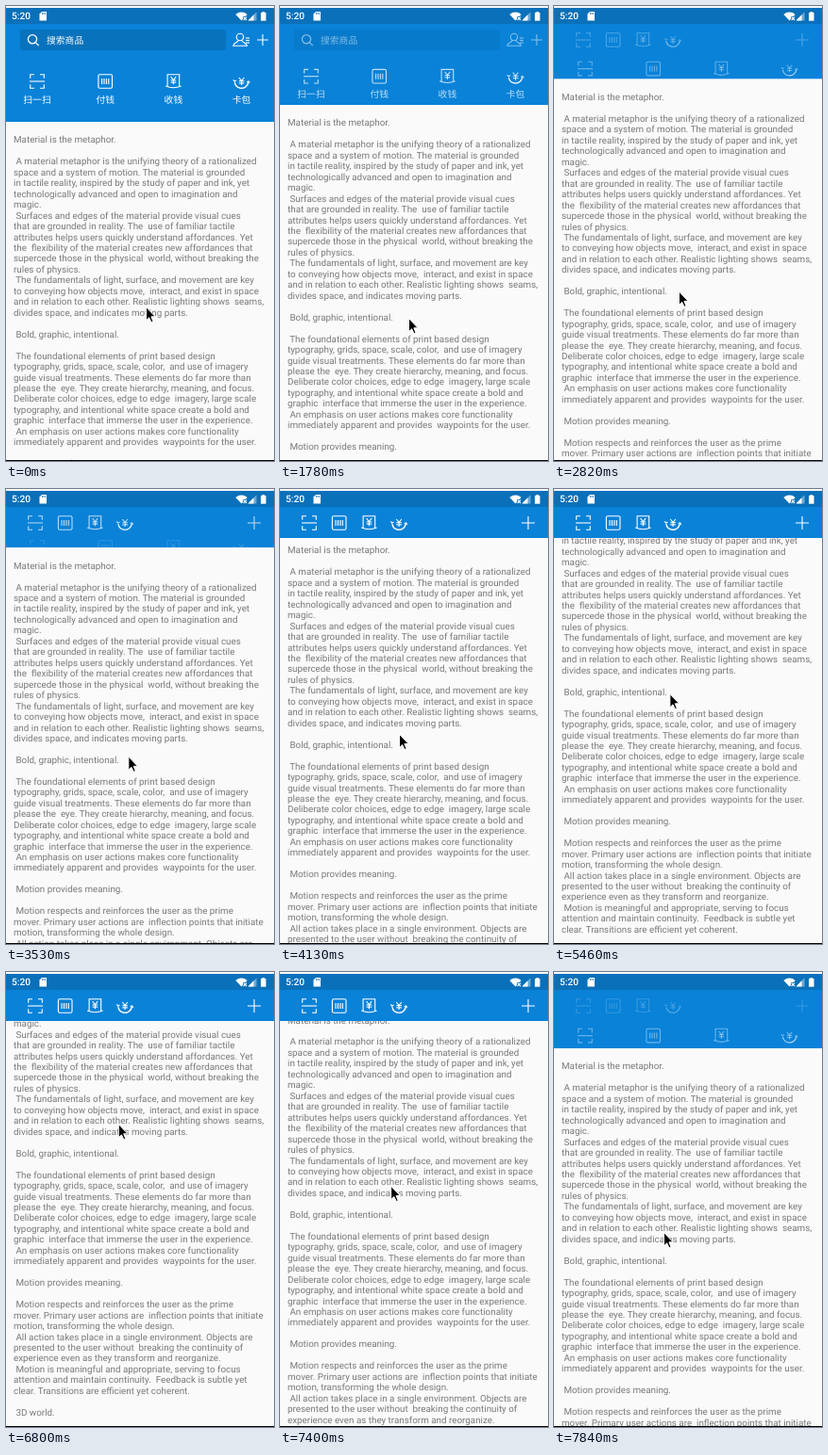
An HTML page with a canvas for the animation above (8 s loop, 284x483 px).

```html
<!DOCTYPE html>
<html lang="en">
<head>
<meta charset="utf-8">
<title>Collapsing header</title>
<style>
html, body { margin: 0; width: 100%; height: 100%; overflow: hidden; background: #fafafa; }
canvas { display: block; width: 284px; height: 483px; }
</style>
</head>
<body>
<canvas id="stage"></canvas>
<script>
const W = 284, H = 483, LOOP = 8000, STEP = 147.4, LAST = 53;
const BLUE = '#0982d8', DARK = '#0a70b9', WHITE = '#fff';
const OPEN = 123, CLOSED = 52, RANGE = OPEN - CLOSED;
const LATIN = 'Roboto, sans-serif', CJK = '"Noto Sans CJK SC", "Noto Sans CJK", sans-serif';

const lines = `Material is the metaphor.

 A material metaphor is the unifying theory of a rationalized
space and a system of motion. The material is grounded
in tactile reality, inspired by the study of paper and ink, yet
technologically advanced and open to imagination and
magic.
 Surfaces and edges of the material provide visual cues
that are grounded in reality. The  use of familiar tactile
attributes helps users quickly understand affordances. Yet
the  flexibility of the material creates new affordances that
supercede those in the physical  world, without breaking the
rules of physics.
 The fundamentals of light, surface, and movement are key
to conveying how objects move,  interact, and exist in space
and in relation to each other. Realistic lighting shows  seams,
divides space, and indicates moving parts.

 Bold, graphic, intentional.

 The foundational elements of print based design
typography, grids, space, scale, color,  and use of imagery
guide visual treatments. These elements do far more than
please the  eye. They create hierarchy, meaning, and focus.
Deliberate color choices, edge to edge  imagery, large scale
typography, and intentional white space create a bold and
graphic  interface that immerse the user in the experience.
 An emphasis on user actions makes core functionality
immediately apparent and provides  waypoints for the user.

 Motion provides meaning.

 Motion respects and reinforces the user as the prime
mover. Primary user actions are  inflection points that initiate
motion, transforming the whole design.
 All action takes place in a single environment. Objects are
presented to the user without  breaking the continuity of
experience even as they transform and reorganize.
 Motion is meaningful and appropriate, serving to focus
attention and maintain continuity.  Feedback is subtle yet
clear. Transitions are efficient yet coherent.

 3D world.`.split('\n');

const clamp = (v, lo, hi) => Math.min(hi, Math.max(lo, v));

// Linear move from a to b between steps s0 and s1, held outside
const move = (n, s0, s1, a, b) => a + (b - a) * clamp((n - s0) / (s1 - s0), 0, 1);

// Sum of moves: start value, then [first step, last step, distance]
const path = (n, start, ...legs) =>
  legs.reduce((v, [s0, s1, d]) => v + move(n, s0, s1, 0, d), start);

// The screen is refreshed in even steps; the hand rests between drags
function poseAt(t) {
  const n = Math.min(LAST, Math.floor(t / STEP));
  return {
    x: path(n, 148, [0, 4, -2], [5, 7, -10], [13, 28, -10], [28, LAST, -10]),
    y: path(n, 318, [0, 4, -8], [5, 7, 39], [8, 12, -19], [13, 37, -114], [37, 46, -56], [46, LAST, 115]),
    scroll: path(n, 0, [8, 12, 18], [13, 28, 59], [28, 37, 56], [37, 41, 23], [46, LAST, -114])
      + (n > 13 && n < 28 ? 4 * Math.sin(Math.PI * (n - 13) / 15) : 0)
  };
}

const canvas = document.getElementById('stage');
const ctx = canvas.getContext('2d');
const dpr = window.devicePixelRatio || 1;
canvas.width = W * dpr;
canvas.height = H * dpr;

function rect(x, y, w, h, color) {
  ctx.fillStyle = color;
  ctx.fillRect(x, y, w, h);
}

function text(str, x, y, font, color, align = 'left') {
  ctx.font = font;
  ctx.fillStyle = color;
  ctx.textAlign = align;
  ctx.fillText(str, x, y);
}

// Strokes polylines given as flat coordinate lists
function stroke(...paths) {
  ctx.beginPath();
  for (const p of paths) {
    ctx.moveTo(p[0], p[1]);
    for (let i = 2; i < p.length; i += 2) ctx.lineTo(p[i], p[i + 1]);
  }
  ctx.stroke();
}

function fill(color, ...p) {
  ctx.fillStyle = color;
  ctx.beginPath();
  for (let i = 0; i < p.length; i += 2) ctx.lineTo(p[i], p[i + 1]);
  ctx.closePath();
  ctx.fill();
}

function arc(x, y, r, a = 0, b = Math.PI * 2) {
  ctx.beginPath();
  ctx.arc(x, y, r, a, b);
  ctx.stroke();
}

function at(x, y, draw) {
  ctx.save();
  ctx.translate(x, y);
  ctx.strokeStyle = WHITE;
  ctx.lineWidth = 1.1;
  draw();
  ctx.restore();
}

function yen() {
  stroke([-2.8, -4, 0, -0.7, 2.8, -4], [0, -0.7, 0, 4]);
  for (const y of [-0.3, 1.9]) stroke([-2.8, y, 2.8, y]);
}

const icons = [
  function scan() {
    for (const sx of [-1, 1]) for (const sy of [-1, 1])
      stroke([sx * 7.3, sy * 3.2, sx * 7.3, sy * 7.3, sx * 3, sy * 7.3]);
    stroke([-8, 0, 8, 0]);
  },
  function pay() {
    ctx.beginPath();
    ctx.roundRect(-7.3, -7.3, 14.6, 14.6, 1.5);
    ctx.stroke();
    for (let x = -3.6; x < 4; x += 2.4) stroke([x, -3, x, 3]);
  },
  function receive() {
    stroke([-6.3, 5.5, -6.3, -7.3, 6.3, -7.3, 6.3, 5.5]);
    ctx.beginPath();
    ctx.moveTo(-8.2, 5);
    ctx.quadraticCurveTo(0, 8.5, 8.2, 5);
    ctx.stroke();
    at(0, -0.8, yen);
  },
  function cards() {
    for (const side of [0, Math.PI]) {
      arc(0, 0, 7.3, side + 0.15, side + 2.95);
      ctx.rotate(Math.PI);
      stroke([-8.8, -1.6, -7.3, 0.3, -5.6, -1.2]);
    }
    yen();
  }
];

function plus(x, r) {
  at(x, 36, () => stroke([-r, 0, r, 0], [0, -r, 0, r]));
}

function statusBar() {
  rect(0, 0, W, 19, DARK);
  rect(0, 0, W, 2, '#f6f8fa');
  text('5:20', 6, 14.3, '500 10.2px ' + LATIN, WHITE);
  fill(WHITE, 38, 6, 43, 6, 43, 15.5, 35.5, 15.5, 35.5, 8.6);
  for (let x = 38; x < 42; x += 1.6) rect(x, 7, 0.7, 2, DARK);
  ctx.fillStyle = WHITE;
  ctx.beginPath();
  ctx.moveTo(249.5, 15.5);
  ctx.arc(249.5, 15.5, 9, -Math.PI * 0.74, -Math.PI * 0.26);
  ctx.fill();
  rect(251, 11, 5, 5, DARK);
  at(253.3, 13.3, () => stroke([-1.7, -1.7, 1.7, 1.7], [-1.7, 1.7, 1.7, -1.7]));
  fill('#6fa9d4', 265.5, 6.2, 265.5, 15.5, 256.5, 15.5);
  fill(WHITE, 262.5, 9.2, 262.5, 15.5, 256.5, 15.5);
  rect(270, 7, 5.5, 8.7, WHITE);
  rect(271.5, 6, 2.5, 1.5, WHITE);
}

function openBar() {
  ctx.fillStyle = '#0872bc';
  ctx.beginPath();
  ctx.roundRect(15, 25, 218, 22, 2.5);
  ctx.fill();
  at(28, 35.3, () => {
    ctx.lineWidth = 1.3;
    arc(0, 0, 4.6);
    stroke([3.3, 3.3, 6.8, 6.8]);
  });
  text('搜索商品', 43, 39.8, '9.8px ' + CJK, WHITE);
  at(248, 36, () => {
    arc(0, -3, 3.7);
    ctx.beginPath();
    ctx.moveTo(-2, 0.5);
    ctx.bezierCurveTo(-2, 3, -7, 2.5, -7.3, 6.3);
    ctx.lineTo(7.5, 6.3);
    ctx.bezierCurveTo(7, 3.2, 2.5, 3, 2, 0.5);
    ctx.stroke();
    for (let y = -2; y < 4; y += 2.5) stroke([6, y, 10, y]);
  });
  plus(272, 6);
}

function closedBar() {
  icons.forEach((icon, i) => at(31 + i * 31.7, 36, icon));
  plus(263, 7);
}

function header(scroll) {
  const bottom = Math.max(CLOSED, OPEN - scroll);
  const shift = OPEN - bottom, half = RANGE / 2;
  ctx.save();
  ctx.beginPath();
  ctx.rect(0, 0, W, bottom);
  ctx.clip();
  rect(0, 0, W, bottom, BLUE);
  ctx.globalAlpha = 1 - shift / RANGE;
  ['扫一扫', '付钱', '收钱', '卡包'].forEach((label, i) => {
    const x = 33 + i * 72.2, y = 80 - shift * 0.295;
    at(x, y, icons[i]);
    text(label, x, y + 22.8, '9.8px ' + CJK, WHITE, 'center');
  });
  // The bar swaps halfway, fading out and in again
  ctx.globalAlpha = Math.abs(shift - half) / half;
  (shift <= half ? openBar : closedBar)();
  ctx.restore();
}

function pointer(x, y) {
  at(x, y + 0.8, () => {
    const shape = [0.5, 0.8, 0.5, 15, 3.6, 12, 6.1, 17, 8, 16.2, 5.9, 11, 10.2, 11];
    fill('#000', ...shape);
    ctx.lineJoin = 'round';
    ctx.lineWidth = 1;
    stroke([...shape, ...shape.slice(0, 2)]);
  });
}

function draw(t) {
  const { x, y, scroll } = poseAt(t);
  ctx.setTransform(dpr, 0, 0, dpr, 0, 0);
  ctx.textRendering = 'geometricPrecision';
  rect(0, 0, W, H, '#fafafa');
  lines.forEach((line, i) =>
    text(line, 8, 145.4 + i * 11.46 - scroll, '9.83px ' + LATIN, '#797979'));
  header(scroll);
  statusBar();
  rect(0, 482, W, 1, '#000');
  pointer(x, y);
}

const start = performance.now();
function frame() {
  draw((performance.now() - start) % LOOP);
  requestAnimationFrame(frame);
}
frame();
</script>
</body>
</html>
```
